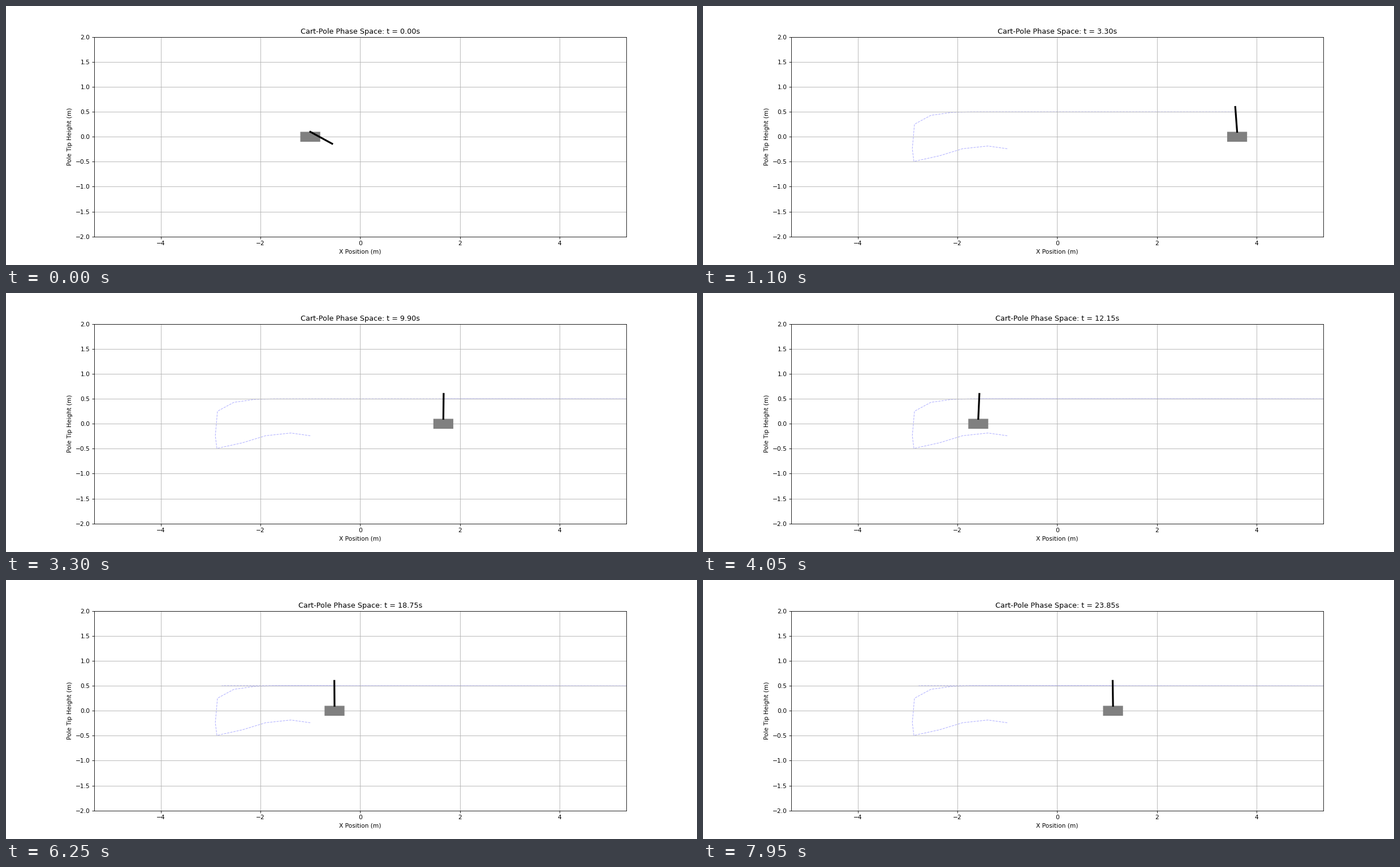
Write a matplotlib script that moves like this. It is 1222 px wide and 458 px high and loops after 8000 ms.

```python
import numpy as np
import matplotlib.pyplot as plt
from matplotlib.animation import FuncAnimation
from matplotlib.patches import Rectangle

FRAMES, INTERVAL = 160, 50
DPI = 76.375
DT, GRAVITY = 0.15, 9.81
POLE = 0.5
CART_W, CART_H = 0.4, 0.2

# Swing-up poses, one per step, before the balancing phase
SWING_X = [-1.0, -1.39, -1.897, -2.363, -2.873, -2.905, -2.862, -2.533]
SWING_ANGLE = [2.07, 1.95, 2.07, 2.44, 3.30, 4.21, 5.24, 5.75]
CATCH = len(SWING_X)


def glide(n):
    """Balancing cart: a damped swing about zero plus a fading start-up term."""
    since = n - 72.8
    swing = -4.12 * np.exp(-0.0151 * since) * np.sin(0.05486 * since)
    return swing + 2.3 * np.exp(-0.105 * (n - CATCH))


def lean(n):
    """The balanced pole leans into the cart's acceleration."""
    accel = (glide(n + 1) - 2 * glide(n) + glide(n - 1)) / DT ** 2
    return accel / GRAVITY - 0.29 * 0.4 ** (n - CATCH)


steps = np.arange(CATCH, FRAMES)
cart_x = np.concatenate([SWING_X, glide(steps)])
angle = np.concatenate([SWING_ANGLE, lean(steps)])
tip_dx, tip_dy = POLE * np.sin(angle), POLE * np.cos(angle)

fig, ax = plt.subplots(figsize=(1222 / DPI, 458 / DPI + 1e-6), dpi=DPI)
ax.set_xlim(-5.335, 5.335)
ax.set_ylim(-2, 2)
ax.set_aspect("equal")
ax.set_xlabel("X Position (m)")
ax.set_ylabel("Pole Tip Height (m)")
ax.grid(True)
title = ax.set_title("")

trace, = ax.plot([], [], "b--", lw=1, alpha=0.3, zorder=1)
cart = ax.add_patch(Rectangle((0, 0), CART_W, CART_H, fc="gray", zorder=2,
                              snap=False))
pole, = ax.plot([], [], "k-", lw=3, zorder=3)


def update(n):
    x, top = cart_x[n], CART_H / 2
    trace.set_data(cart_x[:n + 1], tip_dy[:n + 1])
    cart.set_xy((x - CART_W / 2, -CART_H / 2))
    pole.set_data([x, x + tip_dx[n]], [top, top + tip_dy[n]])
    title.set_text(f"Cart-Pole Phase Space: t = {n * DT:.2f}s")
    return trace, cart, pole, title


anim = FuncAnimation(fig, update, frames=FRAMES, interval=INTERVAL,
                     repeat=True, repeat_delay=0, blit=False)
plt.show()
```
